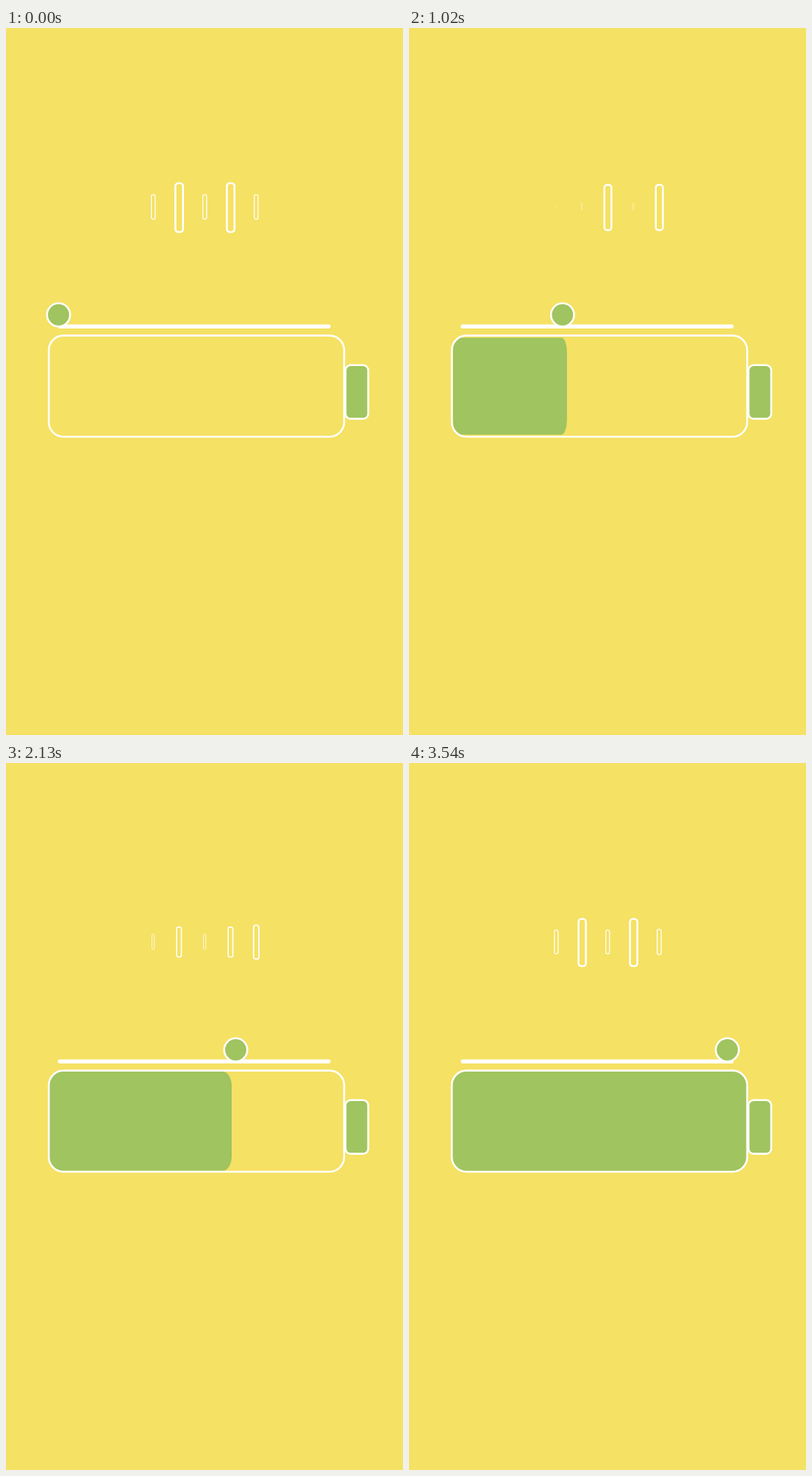
Recreate the animation shown at these times as an HTML page with a canvas. Size 540 by 960 pixels, loop 3570 ms.

```html
<!DOCTYPE html>
<html lang="en">
<head>
<meta charset="utf-8">
<title>Charging battery</title>
<style>
  html, body { margin: 0; height: 100%; overflow: hidden; background: #f5e164; }
  canvas { display: block; }
</style>
</head>
<body>
<canvas id="stage" width="540" height="960"></canvas>
<script>
const ctx = document.getElementById('stage').getContext('2d');
const LOOP = 3570;
const YELLOW = '#f5e164', GREEN = '#a0c460', WHITE = '#fff';

// Linear interpolation through [time, value] stops.
function track(stops, t) {
  const i = Math.max(1, stops.findIndex(([time]) => time >= t));
  const [t0, v0] = stops[i - 1], [t1, v1] = stops[i];
  return v0 + (v1 - v0) * (t - t0) / (t1 - t0);
}

const ballTrack = [[0, 71.5], [1790, 312.5], [2518, 312.5], [LOOP, 436.5]];
const chargeTrack = [[0, 0], [1635, 0.605], [2350, 0.605], [LOOP, 1]];

function roundRect(x, y, w, h, r) {
  ctx.beginPath();
  ctx.roundRect(x, y, w, h, r);
}

function paint(fill, lineWidth) {
  if (fill) {
    ctx.fillStyle = fill;
    ctx.fill();
  }
  if (lineWidth) {
    ctx.strokeStyle = WHITE;
    ctx.lineWidth = lineWidth;
    ctx.stroke();
  }
}

function drawBar(x, scale) {
  if (scale < 0.002) return;
  ctx.save();
  ctx.translate(x, 242);
  ctx.scale(scale, scale);
  roundRect(-4.6, -31.2, 10.4, 66.2, 4);
  paint(null, 2.6);
  ctx.restore();
}

function drawBars(t) {
  const half = LOOP / 2;
  const wave = Math.abs(1 - 2 * (t % half) / half);
  const low = wave / 2, high = 1 - low;
  [low, wave, t < half ? high : low, wave, high]
    .forEach((scale, i) => drawBar(200 + 35 * i, scale));
}

function drawBattery(charge) {
  const left = 61.5 - 4.5 * charge;
  const right = 62 + 405 * charge;
  const halfHeight = 63.3 + 6.8 * charge;

  ctx.save();
  roundRect(58.2, 417.6, 401.8, 137.4, 20);
  ctx.clip();
  if (charge > 0.001) {
    ctx.save();
    ctx.translate(left, 486.3);
    ctx.scale((right - left) / 410, 1);
    roundRect(0, -halfHeight, 410, 2 * halfHeight, 20);
    ctx.restore();
    paint(GREEN);
  }
  ctx.restore();

  roundRect(58.2, 417.6, 401.8, 137.4, 20);
  paint(null, 2.6);
  roundRect(461.8, 457.8, 30.9, 72.8, 7);
  paint(GREEN, 2.6);
}

function drawSlider(x) {
  roundRect(70.5, 402.6, 371, 5.3, 2.65);
  paint(WHITE);
  ctx.beginPath();
  ctx.arc(x, 389.5, 15.7, 0, 2 * Math.PI);
  paint(GREEN, 2.6);
}

function draw(now) {
  const t = now % LOOP;
  ctx.fillStyle = YELLOW;
  ctx.fillRect(0, 0, 540, 960);
  drawBars(t);
  drawSlider(track(ballTrack, t));
  drawBattery(track(chargeTrack, t));
}

let start;
function tick(now) {
  start ??= now;
  draw(now - start);
  requestAnimationFrame(tick);
}
draw(0);
requestAnimationFrame(tick);
</script>
</body>
</html>
```
